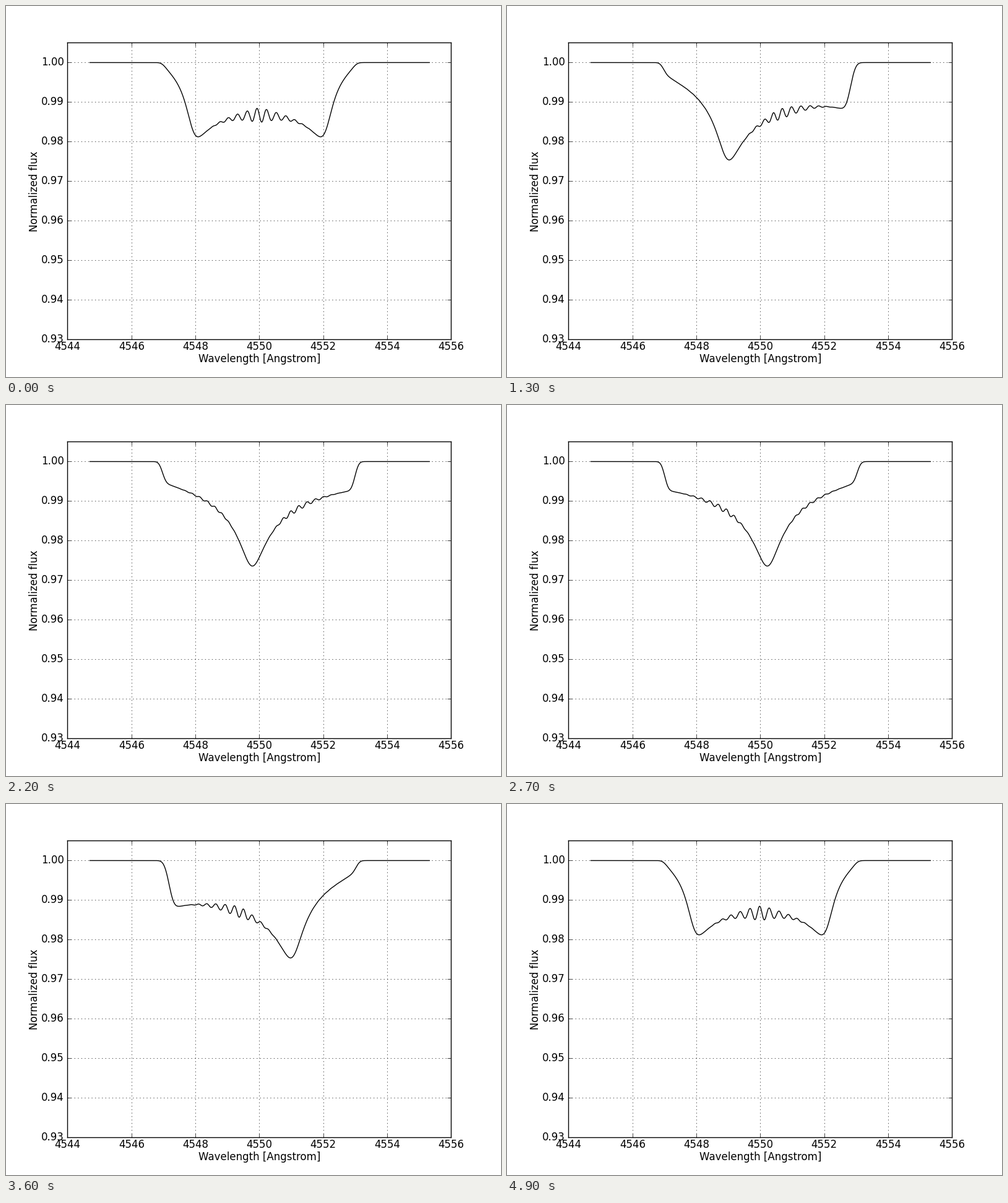
A matplotlib script that plays this animation: 800x600 px, repeating every 5000 ms.

```python
import numpy as np
import matplotlib.pyplot as plt
from matplotlib.animation import FuncAnimation

plt.style.use("classic")
plt.rcParams.update({
    "font.family": "DejaVu Sans",
    "figure.facecolor": "white",
    "axes.formatter.useoffset": False,
    "axes.labelpad": 1.4,
    "xtick.major.pad": 1.8,
})

WIDTH, HEIGHT, DPI = 800, 600, 100
FRAMES = 50
INTERVAL = 100

# Rotating, limb-darkened sphere with a sectoral pulsation travelling along it
CENTER = 4550.0
V_ROT = 3.01          # equatorial rotation, in Angstrom
V_PULSE = 0.42        # pulsation amplitude, in Angstrom
MODE = 4
LIMB = 0.45
SIGMA = 0.095         # width of the local line
STRENGTH = 0.0762     # equivalent width
STEP = np.radians(4)  # spacing of the surface meridians
DRIFT = 0.575         # meridian spacings moved per frame

offset = np.linspace(-5.3, 5.32, 700)
colatitude = (np.arange(36) + 0.5) * np.pi / 72
sin_t = np.sin(colatitude)[:, None]


def line_profile(frame):
    lon = (np.arange(90) + 0.25 + DRIFT * frame) * STEP
    lon = (lon + np.pi) % (2 * np.pi) - np.pi
    lon = lon[np.cos(lon) > 0][None, :]

    crest = (frame / (FRAMES - 1) - 0.5) * 2 * np.pi / MODE
    mu = sin_t * np.cos(lon)
    wave = sin_t**MODE * np.sin(MODE * (lon - crest))
    velocity = V_ROT * sin_t * np.sin(lon) - V_PULSE * mu * wave
    weight = sin_t * mu * (1 - LIMB + LIMB * mu)

    shift = (offset[:, None] - velocity.ravel()) / SIGMA
    depth = np.exp(-0.5 * shift**2) @ weight.ravel() / weight.sum()
    return 1 - STRENGTH * depth / (SIGMA * np.sqrt(2 * np.pi))


fig = plt.figure(figsize=(WIDTH / DPI, HEIGHT / DPI), dpi=DPI)
# The half-pixel shift sets which pixel row and column the frame snaps to
ax = fig.add_axes([99.45 / WIDTH, 60.55 / HEIGHT, 620 / WIDTH, 480 / HEIGHT])
ax.set_xlim(4544, 4556)
ax.set_ylim(0.93, 1.005)
ax.set_xticks(np.arange(4544, 4557, 2))
ax.set_yticks(np.arange(93, 101) / 100)
ax.yaxis.set_major_formatter("{x:.2f}")
ax.set_xlabel("Wavelength [Angstrom]")
ax.set_ylabel("Normalized flux")
ax.grid(True)
line, = ax.plot(CENTER + offset, line_profile(0), color="black", lw=1)


def update(frame):
    line.set_ydata(line_profile(frame))
    return line,


anim = FuncAnimation(fig, update, frames=FRAMES, interval=INTERVAL,
                     repeat=True, repeat_delay=0)
plt.show()
```
